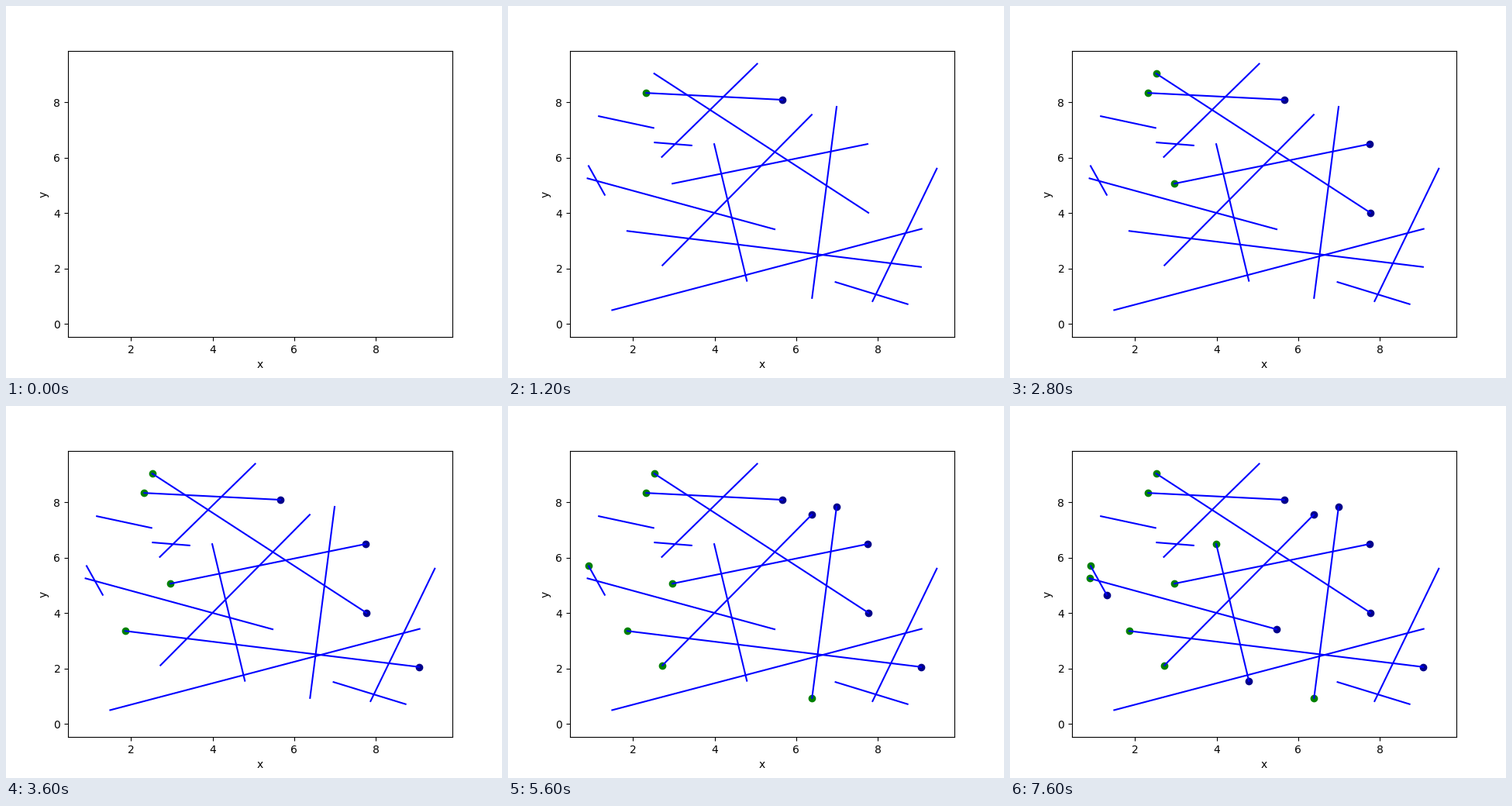
These frames come from a looping animation (640x480 px, 8 s). A matplotlib script:

```python
import matplotlib.pyplot as plt
import numpy as np
from matplotlib.animation import FuncAnimation

X_LIM = (0.453, 9.881)
Y_LIM = (-0.47, 9.87)
FRAME_COUNT = 20
INTERVAL = 400

# Segments as (x0, y0, x1, y1) in stage pixels, y downwards, in the order
# in which their end points get marked.
SEGMENTS = np.array([
    (178.4, 112.2, 353.9, 121.0),
    (188.7, 87.2, 465.0, 266.8),
    (212.2, 229.2, 463.9, 178.1),
    (153.9, 290.3, 532.9, 336.7),
    (199.3, 334.6, 391.9, 140.3),
    (392.3, 376.8, 424.0, 130.0),
    (104.0, 206.4, 124.8, 243.7),
    (102.6, 222.4, 344.0, 288.1),
    (266.1, 178.2, 308.2, 354.6),
    (117.2, 142.2, 187.7, 157.3),
    (189.3, 176.1, 236.8, 179.9),
    (198.5, 194.8, 321.5, 74.6),
    (134.4, 392.4, 533.7, 287.6),
    (422.6, 356.2, 515.6, 384.7),
    (470.4, 380.9, 553.3, 209.8),
])


def to_data(px, py):
    """Convert stage pixels to data coordinates of the default axes."""
    x = X_LIM[0] + (px - 80) / 496 * (X_LIM[1] - X_LIM[0])
    y = Y_LIM[0] + (427.2 - py) / 369.6 * (Y_LIM[1] - Y_LIM[0])
    return x, y


fig, ax = plt.subplots(figsize=(6.4, 4.8), dpi=100)
ax.set(xlim=X_LIM, ylim=Y_LIM, xlabel="x", ylabel="y",
       xticks=[2, 4, 6, 8], yticks=[0, 2, 4, 6, 8])

starts = to_data(SEGMENTS[:, 0], SEGMENTS[:, 1])
ends = to_data(SEGMENTS[:, 2], SEGMENTS[:, 3])
lines = [ax.plot([x0, x1], [y0, y1], color="blue", lw=1.5)[0]
         for x0, y0, x1, y1 in zip(*starts, *ends)]
start_dots, = ax.plot([], [], "o", color="green", zorder=1.9)
end_dots, = ax.plot([], [], "o", color="darkblue", zorder=1.9)


def update(frame):
    for line in lines:
        line.set_visible(frame > 0)
    marked = max(frame - 1, 0)
    start_count, end_count = (marked + 1) // 2, marked // 2
    start_dots.set_data(starts[0][:start_count], starts[1][:start_count])
    end_dots.set_data(ends[0][:end_count], ends[1][:end_count])
    return [*lines, start_dots, end_dots]


anim = FuncAnimation(fig, update, frames=FRAME_COUNT, interval=INTERVAL,
                     repeat=True, repeat_delay=0)
plt.show()
```
